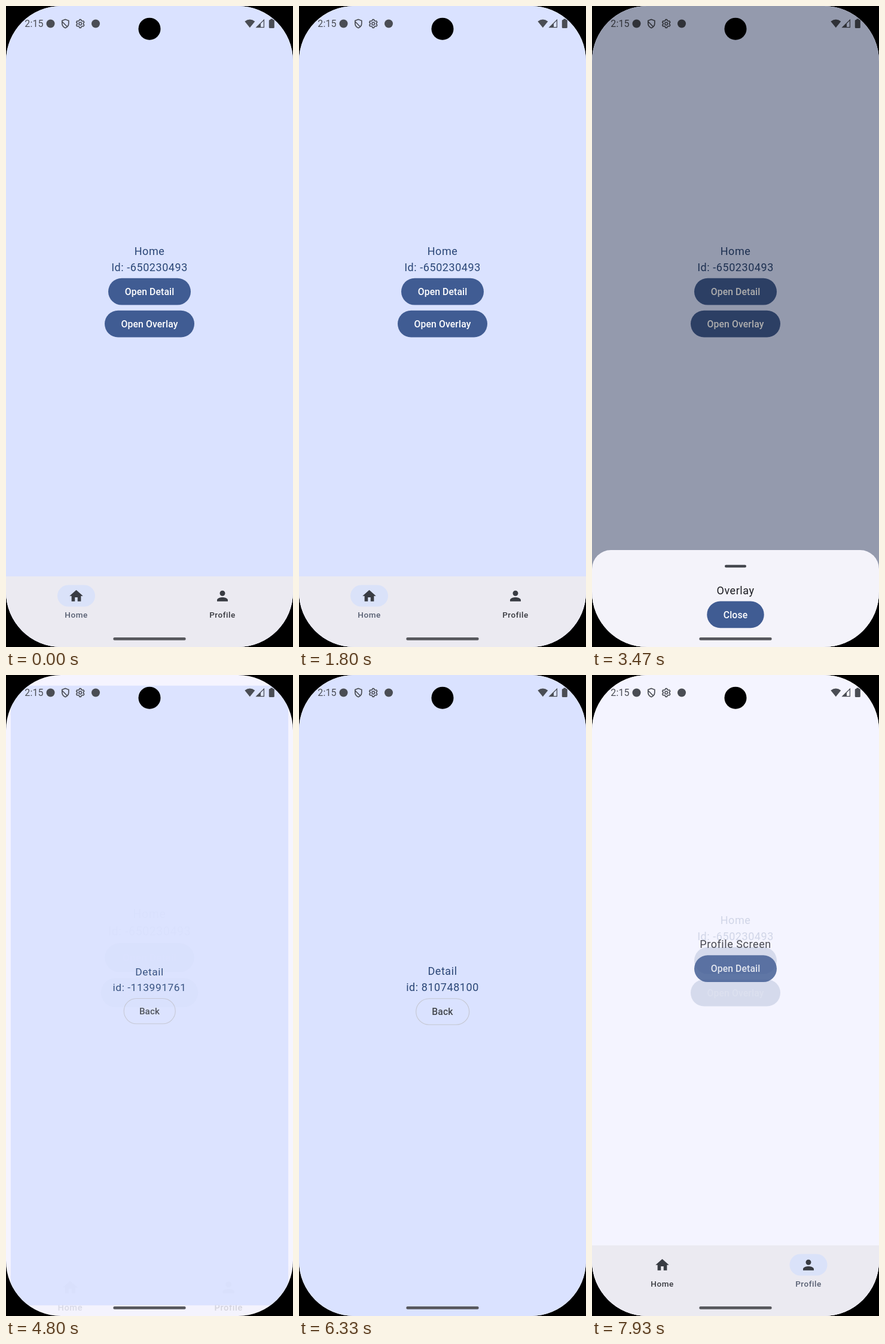
Animation of 480 by 1071 pixels, one loop 8000 ms. Source, as an HTML page with a canvas:

```html
<!DOCTYPE html>
<html lang="en">
<head>
<meta charset="utf-8">
<title>Navigation demo</title>
<style>
html, body { margin: 0; width: 100%; height: 100%; overflow: hidden; background: #000; }
canvas { display: block; width: 480px; height: 1071px; }
</style>
</head>
<body>
<canvas id="stage"></canvas>
<script>
const W = 480, H = 1071, LOOP = 8000;
const canvas = document.getElementById('stage');
const ctx = canvas.getContext('2d');
const dpr = window.devicePixelRatio || 1;
canvas.width = W * dpr;
canvas.height = H * dpr;

const PRIMARY = [64, 92, 147];
const CONTAINER = [218, 226, 255];
const SURFACE = [250, 248, 255];
const INK = '#2a4676';
const MUTED = '#44474e';

const HOUSE = new Path2D('M10 20v-6h4v6h5v-8h3L12 3 2 12h3v8z');
const PERSON = new Path2D('M12 12c2.2 0 4-1.8 4-4s-1.8-4-4-4-4 1.8-4 4 1.8 4 4 4zm0 2c-2.7 0-8 1.3-8 4v2h16v-2c0-2.7-5.3-4-8-4z');
const SHIELD = new Path2D('M0-7L5.5-5V-.5C5.5 3 3 6 0 7.2C-3 6-5.5 3-5.5-.5V-5ZM-5-3L3 5');

const clamp = v => Math.min(1, Math.max(0, v));
const ramp = (t, a, b) => clamp((t - a) / (b - a));
const mix = (a, b, p) => a + (b - a) * p;
const blend = (a, b, p) => `rgb(${a.map((v, i) => Math.round(mix(v, b[i], p)))})`;

// cubic-bezier(.4, 0, .2, 1)
function ease(x) {
  if (x <= 0 || x >= 1) return clamp(x);
  let lo = 0, hi = 1, s = 0;
  for (let i = 0; i < 24; i++) {
    s = (lo + hi) / 2;
    const r = 1 - s;
    const bx = 1.2 * r * r * s + 0.6 * r * s * s + s * s * s;
    if (bx < x) lo = s; else hi = s;
  }
  return 3 * (1 - s) * s * s + s * s * s;
}

const move = (t, start, length) => ease(ramp(t, start, start + length));

function fillAll(color) {
  ctx.fillStyle = color;
  ctx.fillRect(0, 0, W, H);
}

function box(x, y, w, h, r, color) {
  ctx.beginPath();
  ctx.roundRect(x, y, w, h, r);
  ctx.fillStyle = color;
  ctx.fill();
}

function disc(x, y, r, color) {
  ctx.beginPath();
  ctx.arc(x, y, r, 0, Math.PI * 2);
  ctx.fillStyle = color;
  ctx.fill();
}

function label(text, x, y, color, size = 18, weight = 400, spacing = 0.56) {
  ctx.font = `${weight} ${size}px Roboto, sans-serif`;
  ctx.letterSpacing = spacing + 'px';
  ctx.textAlign = 'center';
  ctx.fillStyle = color;
  ctx.fillText(text, x, y);
}

function button(text, y, w, press = 0) {
  box(240 - w / 2, y, w, 44.8, 22.4, blend(PRIMARY, [255, 255, 255], press * 0.1));
  label(text, 240, y + 28, '#fff', 15.75, 500, 0.11);
}

function faded(alpha, draw) {
  if (alpha <= 0) return;
  ctx.save();
  ctx.globalAlpha *= alpha;
  draw();
  ctx.restore();
}

function scaled(s, alpha, draw) {
  faded(alpha, () => {
    ctx.translate(W / 2, H / 2);
    ctx.scale(s, s);
    ctx.translate(-W / 2, -H / 2);
    draw();
  });
}

function navItem(x, icon, text, on) {
  const w = 63 * mix(0.5, 1, on);
  faded(on, () => box(x - w / 2, 967.5, w, 36, 18, '#dae2f9'));
  ctx.save();
  ctx.translate(x - 13.5, 972.3);
  ctx.scale(1.125, 1.125);
  ctx.fillStyle = '#393c43';
  ctx.fill(icon);
  ctx.restore();
  label(text, x, 1021.5, on > 0.5 ? '#565e71' : '#36383e', 13.5, 500);
}

function homeScreen(t, swap) {
  fillAll(blend(CONTAINER, SURFACE, swap));
  faded(1 - swap, () => {
    label('Home', 240, 415.8, INK);
    label('Id: -650230493', 240, 442.7, INK);
    button('Open Detail', 454.8, 138);
    button('Open Overlay', 508.7, 150, ramp(t, 2480, 2540) - ramp(t, 2700, 2800));
  });
  faded(swap, () => {
    label('Profile Screen', 240, 456.2, '#24262c');
    button('Open Detail', 468.3, 138);
  });

  ctx.fillStyle = '#ebeaf1';
  ctx.fillRect(0, 953, W, H - 953);
  const pick = clamp(swap * 1.6);
  navItem(117.5, HOUSE, 'Home', 1 - pick);
  navItem(362, PERSON, 'Profile', pick);
}

function detailScreen(id) {
  fillAll(blend(CONTAINER, CONTAINER, 0));
  label('Detail', 240, 501.3, INK);
  label('id: ' + id, 240, 528.2, INK);
  ctx.beginPath();
  ctx.roundRect(195.7, 540.7, 89, 43.6, 21.8);
  ctx.strokeStyle = '#c4c6d0';
  ctx.lineWidth = 1.1;
  ctx.stroke();
  label('Back', 240, 568.2, MUTED, 15.75, 500, 0.11);
}

function overlay(p) {
  if (p <= 0) return;
  fillAll(`rgba(0,0,0,${0.32 * Math.pow(p, 1.9)})`);
  const y = mix(H, 909, p);
  box(0, y, W, 170, [31.5, 31.5, 0, 0], '#f4f3fa');
  box(222, y + 24.7, 36, 4.6, 2.3, MUTED);
  label('Overlay', 240, y + 73.8, '#1a1b20');
  button('Close', y + 85.5, 95.5);
}

function gear(x, y, color) {
  ctx.beginPath();
  for (let i = 0; i <= 72; i++) {
    const a = i / 72 * Math.PI * 2;
    const r = 5.3 + clamp(Math.cos(a * 6) * 2 + 0.5) * 1.6;
    ctx.lineTo(x + r * Math.sin(a), y - r * Math.cos(a));
  }
  ctx.closePath();
  ctx.moveTo(x + 2.3, y);
  ctx.arc(x, y, 2.3, 0, Math.PI * 2);
  ctx.strokeStyle = color;
  ctx.lineWidth = 1.6;
  ctx.stroke();
}

function statusBar(shade) {
  const color = blend([74, 77, 84], [48, 50, 56], shade);
  label('2:15', 47, 35, color, 16, 400, 0.1);
  disc(74.5, 29.5, 7, color);
  ctx.save();
  ctx.translate(99.3, 29.5);
  ctx.strokeStyle = color;
  ctx.lineWidth = 1.7;
  ctx.stroke(SHIELD);
  ctx.restore();
  gear(124.2, 29.5, color);
  disc(150, 29.5, 7, color);

  // wifi fan, signal wedge, battery
  ctx.fillStyle = ctx.strokeStyle = color;
  ctx.beginPath();
  ctx.moveTo(407.8, 36.3);
  ctx.lineTo(399.3, 25.8);
  ctx.quadraticCurveTo(407.8, 19, 416.3, 25.8);
  ctx.fill();
  ctx.lineWidth = 1.3;
  ctx.beginPath();
  ctx.moveTo(419, 35.6);
  ctx.lineTo(431.4, 35.6);
  ctx.lineTo(431.4, 23.4);
  ctx.closePath();
  ctx.stroke();
  ctx.beginPath();
  ctx.moveTo(419, 35.6);
  ctx.lineTo(426, 28.7);
  ctx.lineTo(426, 35.6);
  ctx.fill();
  box(439.8, 23, 9, 14, 1.5, color);
  box(442.3, 21.4, 4, 3, 0.5, color);
}

function render(t) {
  ctx.setTransform(dpr, 0, 0, dpr, 0, 0);
  fillAll('#000');
  ctx.save();
  ctx.beginPath();
  ctx.roundRect(0, 0, W, H, 92);
  ctx.clip();
  fillAll(`rgb(${SURFACE})`);

  const sheet = move(t, 2577, 300) - move(t, 3950, 260);
  const detail = move(t, 4580, 400) - move(t, 5250, 400)
    + move(t, 5850, 400) - move(t, 6900, 400);
  const swap = move(t, 7740, 350);

  scaled(mix(1, 1.1, detail), 1 - detail, () => homeScreen(t, swap));
  const id = t < 5750 ? '-113991761' : '810748100';
  scaled(mix(0.8, 1, detail), Math.sqrt(clamp(detail)), () => detailScreen(id));
  overlay(sheet);
  statusBar(sheet);
  box(179.3, 1055, 121.4, 4.8, 2.4, '#57585d');
  disc(240, 38.2, 18.5, '#000');
  ctx.restore();
}

const start = performance.now();
function tick() {
  render((performance.now() - start) % LOOP);
  requestAnimationFrame(tick);
}
tick();
</script>
</body>
</html>
```
